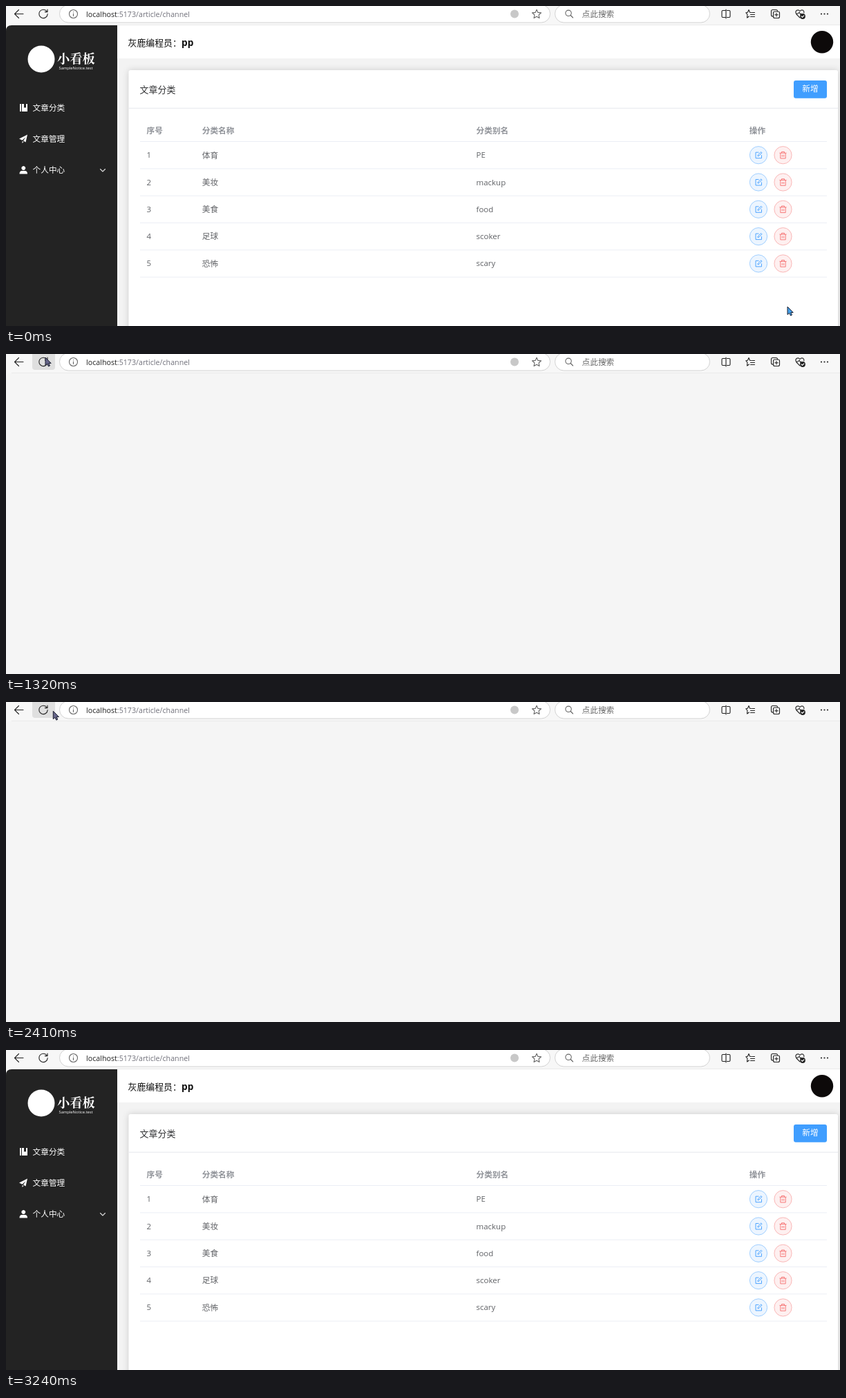
Write an HTML page that moves like this. It is 1207 px wide and 464 px high and loops after 3580 ms.

```html
<!DOCTYPE html>
<html lang="zh-CN">
<head>
<meta charset="utf-8">
<title>文章分类</title>
<style>
html, body { margin: 0; width: 100%; height: 100%; overflow: hidden; background: #f7f7f7; }
svg { display: block; }
#stage { width: 1207px; height: 464px; }
text { font: 11.7px "Open Sans", "Noto Sans CJK SC", "Noto Sans CJK", sans-serif; white-space: pre; }
.line { fill: none; stroke: #222; stroke-width: 1.1; stroke-linecap: round; stroke-linejoin: round; }
.grey { stroke: #666; }
.rule { stroke: #ebeef5; stroke-width: 1; }
.menu text { fill: #fff; font-weight: 500; }
.head text { fill: #909399; font-weight: 700; }
.row text { fill: #606266; }
.row .latin { font-size: 11.5px; }
.edit { fill: #ecf5ff; stroke: #a0cfff; }
.trash { fill: #fef0f0; stroke: #fab6b6; }
.glyph { fill: none; stroke-width: .9; }
#card { filter: drop-shadow(0 0 5px rgba(0, 0, 0, .16)); }
</style>
</head>
<body>
<svg id="stage" viewBox="0 0 1207 464">
  <rect width="1207" height="464" fill="#f7f7f7"/>

  <g id="toolbar">
    <rect id="hover" x="38" y="-6" width="33" height="29" rx="4" fill="#dfdfdf"/>
    <path class="line" d="M25 11.500H12.500M18.500 5.500L12.500 11.500L18.500 17.500"/>
    <path class="line" d="M59.200 8A6.200 6.200 0 1 0 60.200 11.500M60 5V8.600H56.400"/>
    <rect x="77.500" y="-1.500" width="710" height="25.500" rx="12.700" fill="#fff" stroke="#d2d2d2"/>
    <circle class="line grey" cx="97.500" cy="11.500" r="6"/>
    <path class="line grey" d="M97.500 11V14.500M97.500 8.600V8.700"/>
    <text x="116" y="15.500" style="font-size:10.7px" fill="#222">localhost<tspan fill="#70707a">:5173/article/channel</tspan></text>
    <circle cx="736" cy="11.500" r="6" fill="#c8c8c8"/>
    <path class="line grey" id="star"/>
    <rect x="794.500" y="-1.500" width="224" height="25.500" rx="12.700" fill="#fff" stroke="#d2d2d2"/>
    <circle class="line grey" cx="814" cy="10.300" r="4.200"/>
    <path class="line grey" d="M817.200 13.500L820.500 17"/>
    <text x="833.500" y="16" fill="#686868">点此搜索</text>
    <path class="line" d="M1041 6.500H1037.500Q1036 6.500 1036 8V15Q1036 16.500 1037.500 16.500H1041M1043.500 6.500H1046.500Q1048 6.500 1048 8V15Q1048 16.500 1046.500 16.500H1043.500M1042 5V18"/>
    <path class="line" d="M1079 9.500L1076.500 9.200L1075 5.500L1073.300 9.200L1070.800 9.700L1073 12.300L1072.500 17L1075.500 15M1080 9.500H1083.500M1077.500 12.500H1083.500M1077.500 15.500H1083.500"/>
    <path class="line" d="M1110.500 15H1109.500Q1107.500 15 1107.500 13V7.500Q1107.500 5.500 1109.500 5.500H1114.500Q1116.500 5.500 1116.500 7.500"/>
    <rect class="line" x="1110.500" y="8" width="9" height="9.500" rx="2"/>
    <path class="line" d="M1115 10.500V15M1112.700 12.700H1117.300"/>
    <path class="line" d="M1149 17L1144 12Q1141.500 8.500 1144.500 6.300Q1147 5 1149 7.500Q1151 5 1153.700 6.300Q1155.500 8 1154.800 10M1143.500 11H1146.500L1148 9L1150 12.500L1151 11"/>
    <circle cx="1153" cy="15" r="3.900" fill="#222"/>
    <path class="line" d="M1151.200 15L1152.500 16.300L1154.800 14" style="stroke:#fff"/>
    <g fill="#222"><circle cx="1180" cy="11.500" r="1.100"/><circle cx="1184.500" cy="11.500" r="1.100"/><circle cx="1189" cy="11.500" r="1.100"/></g>
  </g>

  <path d="M0 464V35.500Q0 27.500 8 27.500H1207V464Z" fill="#f5f5f5"/>
  <path d="M8 27.500H1207" stroke="#eaeaea"/>

  <g id="page">
    <rect x="161" y="28" width="1046" height="436" fill="#f3f3f3"/>
    <rect x="161" y="28" width="1046" height="48" fill="#fff"/>
    <path d="M0 464V36Q0 28 8 28H161V464Z" fill="#232323"/>
    <circle cx="51" cy="77" r="19.500" fill="#fff"/>
    <text x="74" y="82.500" fill="#fff" style="font:600 18.300px 'Noto Serif CJK SC','Noto Sans CJK SC',serif">小看板</text>
    <text x="76.500" y="91.500" fill="#fff" style="font-size:5.800px">SampleNotice.test</text>

    <g class="menu">
      <text x="38.500" y="151.500">文章分类</text>
      <text x="38.500" y="196.700">文章管理</text>
      <text x="38.500" y="242.200">个人中心</text>
      <path fill="#fff" d="M20 142H22V153H20ZM23 142H26V148L27.500 146.800L29 148V142H31V153H23Z"/>
      <path fill="#fff" d="M19 192.500L31 186.500L28.500 197.500L25 195.500L28.500 190L23.500 194.800ZM23.500 196L25.500 197L23.500 199Z"/>
      <circle cx="25.300" cy="235" r="3"/>
      <path fill="#fff" d="M25.300 232A3 3 0 1 1 25.290 232ZM19.500 243.500Q19.500 239 23 239H27.500Q31 239 31 243.500Z"/>
      <path class="line" style="stroke:#ddd" d="M136.500 236.500L140 240L143.500 236.500"/>
    </g>

    <text x="176.500" y="57.800" style="font-size:12.900px" fill="#111">灰鹿编程员：</text>
    <text x="254" y="57.500" style="font-size:13.700px;font-weight:700" fill="#111">pp</text>
    <circle cx="1181" cy="52.300" r="16.200" fill="#0d0a0a"/>

    <rect id="card" x="177.500" y="93" width="1026.500" height="390" rx="3" fill="#fff"/>
    <path d="M177.500 148.200H1204" stroke="#e4e7ed"/>
    <text x="193.500" y="126" style="font-size:13px" fill="#303133">文章分类</text>
    <rect x="1140" y="108" width="48" height="25.700" rx="3" fill="#409eff"/>
    <text x="1164" y="124.300" fill="#fff" text-anchor="middle" style="font-weight:500">新增</text>

    <g class="head">
      <text x="203.500" y="185.200">序号</text>
      <text x="283.700" y="185.200">分类名称</text>
      <text x="680.500" y="185.200">分类别名</text>
      <text x="1075.700" y="185.200">操作</text>
    </g>
    <path class="rule" d="M194 196.500H1188"/>
    <g id="rows"></g>
    <g id="empty">
      <text x="690.700" y="225" text-anchor="middle" fill="#909399" style="font-size:11.600px">No Data</text>
      <path class="rule" d="M194 245H1188"/>
    </g>
    <g id="loading">
      <rect id="mask" x="194" y="164.500" width="994" fill="#fff" fill-opacity=".9"/>
      <circle id="spinner" r="20" fill="none" stroke="#409eff" stroke-width="2" stroke-linecap="round"/>
    </g>
  </g>

  <path id="arrow" d="M0 0V11.500L2.700 9.200L4.500 13L6.500 12L4.800 8.400H8.200Z" stroke="#1c2030" stroke-width="1"/>
  <path id="beam" d="M-3 -6H3M-3 6H3M0 -6V6" fill="none" stroke="#111" stroke-width="2"/>
</svg>
<script>
const LOOP = 3580, STEP = 68.9, LAST_STEP = 47;
const RELOADS = [
  { blank: 1300, page: 1440, load: 1375, data: 1700 },
  { blank: 2335, page: 2470, load: 2505, data: 2830 }
];
// Pointer path: time, x, y
const PATH = [
  [0, 1131, 436], [140, 1000, 370], [280, 560, 190], [410, 220, 60], [480, 140, 18],
  [550, 115, 11], [620, 112, 11], [900, 95, 8], [970, 95, 8], [1030, 57, 5],
  [2200, 57, 5], [2340, 60, 8], [2411, 68, 13], [2549, 142, 55], [2690, 300, 122],
  [3020, 910, 383], [3100, 1030, 435], [3170, 1150, 487]
];
const $ = id => document.getElementById(id);
const set = (id, attrs) => { for (const k in attrs) $(id).setAttribute(k, attrs[k]); };
const show = (id, on) => $(id).style.display = on ? '' : 'none';
const clamp = x => Math.min(1, Math.max(0, x));

function bezier(x1, y1, x2, y2) {
  const at = (a, b, u) => 3 * a * u * (1 - u) ** 2 + 3 * b * u * u * (1 - u) + u ** 3;
  return x => {
    let lo = 0, hi = 1;
    for (let i = 0; i < 24; i++) {
      const mid = (lo + hi) / 2;
      if (at(x1, x2, mid) < x) lo = mid; else hi = mid;
    }
    return at(y1, y2, lo);
  };
}
const ease = bezier(.25, .1, .25, 1), easeInOut = bezier(.42, 0, .58, 1);

function buildStar() {
  const points = Array.from({ length: 10 }, (_, i) => {
    const a = i * Math.PI / 5 - Math.PI / 2, r = i % 2 ? 3.2 : 6.8;
    return (768 + r * Math.cos(a)).toFixed(1) + ' ' + (12 + r * Math.sin(a)).toFixed(1);
  });
  set('star', { d: 'M' + points.join('L') + 'Z' });
}

function buildRows() {
  const data = [['体育', 'PE'], ['美妆', 'mackup'], ['美食', 'food'], ['足球', 'scoker'], ['恐怖', 'scary']];
  $('rows').innerHTML = data.map(([name, alias], i) => `
    <g class="row" transform="translate(0 ${(216.2 + 39.3 * i).toFixed(1)})">
      <text class="latin" x="203.5" y="4">${i + 1}</text>
      <text x="283.7" y="4.3">${name}</text>
      <text class="latin" x="680.5" y="4">${alias}</text>
      <circle class="edit" cx="1089" r="12.6"/>
      <path class="glyph" stroke="#409eff" d="M1089.500 -4H1085V4.500H1093.500V0M1088 1.500L1088.500 -.500L1092.800 -4.600L1094 -3.300L1089.800 1Z"/>
      <circle class="trash" cx="1124.500" r="12.600"/>
      <path class="glyph" stroke="#f56c6c" d="M1119.500 -3H1129.500M1122.500 -3V-4.800H1126.500V-3M1120.800 -3V4.800H1128.200V-3M1123.300 -.500V2.500M1125.700 -.500V2.500"/>
      <path class="rule" d="M194 19.700H1188"/>
    </g>`).join('');
}

function pointerAt(t) {
  const i = PATH.findIndex(p => p[0] > t);
  if (i < 0) return PATH[PATH.length - 1].slice(1);
  const [t0, x0, y0] = PATH[i - 1], [t1, x1, y1] = PATH[i];
  const u = (t - t0) / (t1 - t0);
  return [x0 + (x1 - x0) * u, y0 + (y1 - y0) * u];
}

function drawPointer(t) {
  const [x, y] = pointerAt(t);
  const typing = y < 24 && x > 105 && x < 725;
  const place = { transform: `translate(${x.toFixed(1)} ${y.toFixed(1)})` };
  show('arrow', !typing);
  show('beam', typing);
  set('arrow', { ...place, fill: y < 27 ? '#66658a' : '#459fe8' });
  set('beam', place);
}

function drawLoading(t, load, data, hasRows) {
  const age = t - load;
  const opacity = ease(clamp(age / 300)) * (1 - ease(clamp((t - data) / 300)));
  const dash = easeInOut(clamp(age / 750));
  $('loading').style.opacity = opacity;
  set('mask', { height: hasRows ? 229 : 81 });
  set('spinner', {
    transform: `translate(691 ${hasRows ? 279 : 205}) scale(.68) rotate(${age * .18})`,
    'stroke-dasharray': `${1 + 89 * dash} ${200 - 50 * dash}`,
    'stroke-dashoffset': -40 * dash
  });
}

function render(time) {
  const t = Math.min(LAST_STEP, Math.floor(time / STEP + .1)) * STEP;
  const reload = RELOADS.filter(r => t >= r.blank).pop();
  const hasRows = !reload || t >= reload.data;
  show('page', !reload || t >= reload.page);
  show('rows', hasRows);
  show('empty', !hasRows);
  show('loading', reload && t >= reload.load);
  if (reload) drawLoading(t, reload.load, reload.data, hasRows);
  $('hover').style.opacity = t < 1165 ? 0 : 1 - clamp((t - 2480) / 140);
  drawPointer(t);
}

buildStar();
buildRows();
const start = performance.now();
function tick() {
  render((performance.now() - start) % LOOP);
  requestAnimationFrame(tick);
}
tick();
</script>
</body>
</html>
```
